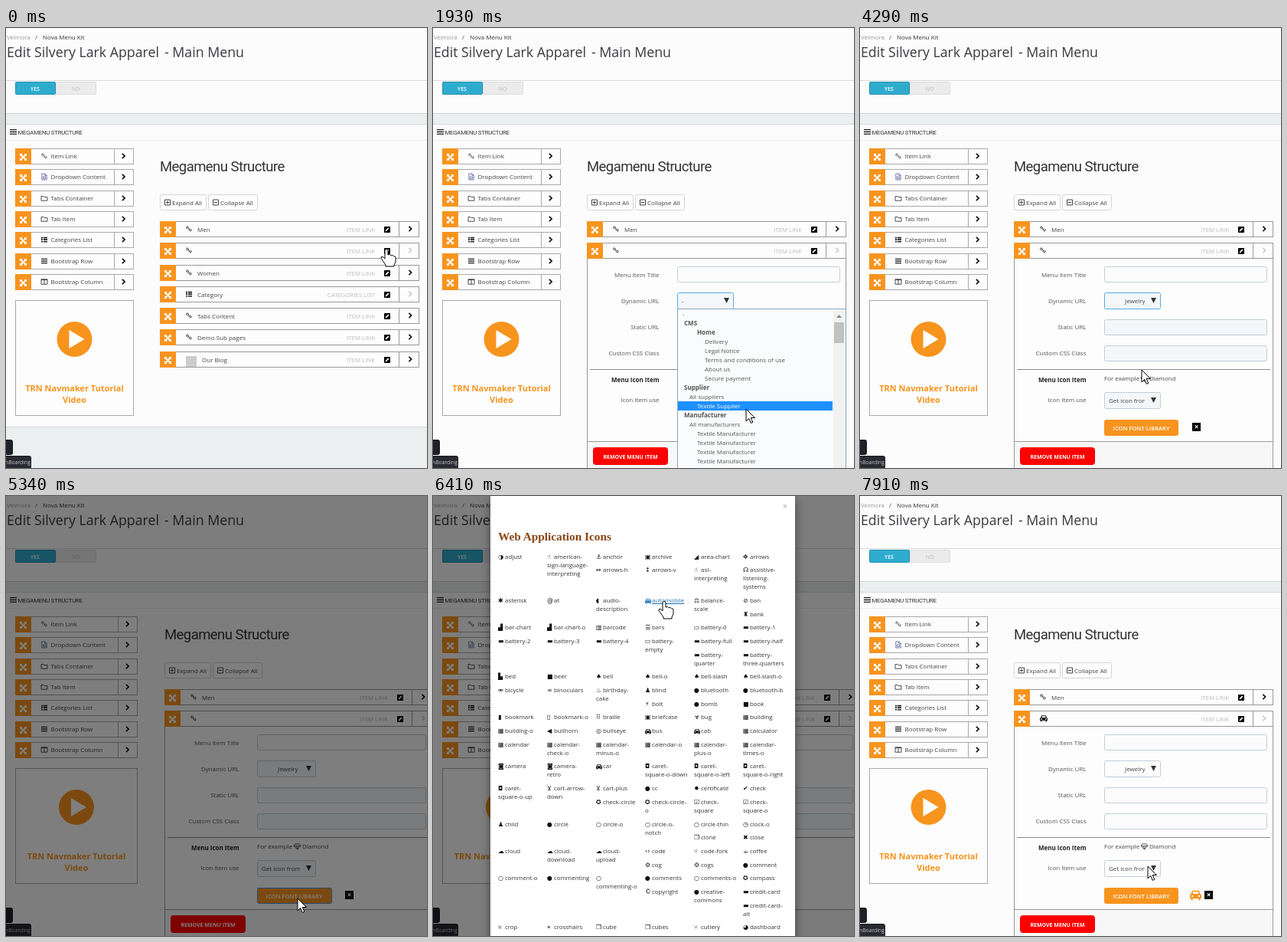
Write an HTML page that moves like this. It is 550 px wide and 574 px high and loops after 8000 ms.

```html
<!DOCTYPE html>
<html lang="en">
<head>
<meta charset="utf-8">
<title>Menu editor</title>
<style>
html, body { margin: 0; width: 100%; height: 100%; overflow: hidden; background: #fcfcfc; }
body { position: relative; font-family: 'Open Sans', sans-serif; }
#page, #cursor, #backdrop { position: absolute; left: 0; top: 0; width: 550px; height: 574px; }
#page { font-family: 'Open Sans', sans-serif; }
#page .heading { font-family: Roboto, sans-serif; letter-spacing: -.03em; }
#backdrop { background: #000; }
#modal { position: absolute; left: 75px; top: 0; width: 398px; height: 1600px; background: #fff; box-shadow: 0 4px 12px #0007; }
#modal h2 { position: absolute; left: 10px; top: 44px; margin: 0; font: bold 15.3px/18px 'Liberation Serif', serif; color: #8b4513; white-space: nowrap; }
#modal ul { position: absolute; left: 10px; top: 73.5px; width: 386px; margin: 0; padding: 0; list-style: none; font-size: 7.9px; line-height: 11px; color: #333; }
#modal li { float: left; width: 64px; padding-bottom: 6.7px; white-space: nowrap; }
#modal i { display: inline-block; width: 9px; height: 11px; vertical-align: top; font: 8px/11px 'DejaVu Sans', sans-serif; color: #111; overflow: hidden; }
#modal i svg { display: block; margin-top: 2px; fill: currentColor; }
#modal li.hover i { color: #1d6fb8; }
#modal li.hover span { color: #1d6fb8; text-decoration: underline; }
#modal b { position: absolute; left: 382px; top: 6px; font-size: 10px; line-height: 14px; color: #bbb; }
</style>
</head>
<body>
<svg id="page" viewBox="0 0 550 574"></svg>
<div id="backdrop"></div>
<div id="modal"><b>×</b><h2>Web Application Icons</h2><ul></ul></div>
<svg id="cursor" viewBox="0 0 550 574"><path fill="#fff" stroke="#000" stroke-linejoin="round"/></svg>
<script>
const LOOP = 8000, STEP = 213.4;
const ORANGE = '#f7941e', BORDER = '#a9a9a9', HEADING = 'class="heading"';
const $ = id => document.getElementById(id);

// Icons on a 10 x 10 grid: the first set is filled, the second stroked.
const fillIcons = {
  car: 'M1 4 2.2 1.2h5.6L9 4q1 .4 1 1.5V8H9v1.5H7.5V8h-5v1.5H1V8H0V5.5Q0 4.4 1 4ZM2.3 4h5.4L7 2.2H3ZM1.3 5.3v1.4h1.5V5.3ZM7.2 5.3v1.4h1.5V5.3Z',
  drag: 'M0 0h4L2.8 1.2 5 3.5 7.2 1.2 6 0h4v4L8.8 2.8 6.5 5 8.8 7.2 10 6v4H6L7.2 8.8 5 6.5 2.8 8.8 4 10H0V6l1.2 1.2L3.5 5 1.2 2.8 0 4Z',
  edit: 'M1 0h8q1 0 1 1v8q0 1-1 1H1q-1 0-1-1V1q0-1 1-1ZM2 8 2.5 6 6.5 2 8 3.5 4 7.5Z',
  list: 'M0 1h2.5v2H0ZM3.5 1H10v2H3.5ZM0 4.2h2.5v2H0ZM3.5 4.2H10v2H3.5ZM0 7.4h2.5v2H0ZM3.5 7.4H10v2H3.5Z',
  bars: 'M0 1h10v1.6H0ZM0 4.2h10v1.6H0ZM0 7.4h10V9H0Z'
};
const lineIcons = {
  link: 'M5 3.4 3.3 1.7a1.4 1.4 0 0 0-2 2L3 5.3M4.5 6.2 6.5 8.2a1.4 1.4 0 0 0 2-2L7 4.6M3.4 3.4 6.4 6.4',
  file: 'M1 0h5l3 3v7H1ZM6 0v3h3M3 5h4v3H3Z',
  folder: 'M0 2h4l1 1.3h5V9H0Z',
  columns: 'M0 1h10v8H0ZM5 1v8M0 2h10',
  chevron: 'M3 1 7 5 3 9',
  diamond: 'M2 1h6l2 3-5 5-5-5ZM0 4h10M3.3 4 5 9 6.7 4',
  plus: 'M0 0h10v10H0ZM2 5h6M5 2v6',
  minus: 'M0 0h10v10H0ZM2 5h6'
};

const rect = (x, y, w, h, fill, stroke = 'none', radius = 0) =>
  `<rect x="${x}" y="${y}" width="${w}" height="${h}" rx="${radius}" fill="${fill}" stroke="${stroke}"/>`;
const box = (x, y, w, h, stroke = BORDER, fill = '#fdfdfd', radius = 0) =>
  rect(x + .5, y + .5, w - 1, h - 1, fill, stroke, radius);
const text = (x, y, s, size = 8, fill = '#444', extra = '') =>
  `<text x="${x}" y="${y}" font-size="${size}" fill="${fill}" ${extra}>${s}</text>`;
const centered = (x, y, s, size, fill, extra = '') => text(x, y, s, size, fill, 'text-anchor="middle" ' + extra);
const icon = (name, x, y, size = 8, color = '#222', weight = 1) => {
  const paint = fillIcons[name] ? `fill="${color}" fill-rule="evenodd"`
    : `fill="none" stroke="${color}" stroke-width="${weight * 10 / size}"`;
  return `<path transform="translate(${x} ${y}) scale(${size / 10})" d="${fillIcons[name] || lineIcons[name]}" ${paint}/>`;
};
const handle = (x, y) => rect(x, y, 21, 21, ORANGE) + icon('drag', x + 6, y + 7, 9, '#fff');
const chevron = (x, y, color = '#111') => icon('chevron', x - 4, y - 4, 8, color, 1.7);

const tools = [['Item Link', 'link'], ['Dropdown Content', 'file'], ['Tabs Container', 'folder'], ['Tab Item', 'folder'],
  ['Categories List', 'list'], ['Bootstrap Row', 'bars'], ['Bootstrap Column', 'columns']];
const menuRows = ['Men', '', 'Women', 'Category', 'Tabs Content', 'Demo Sub pages', 'Our Blog'];

// Drop-down entries; a leading digit gives the level, * marks a heading.
const options = ['0-', '0*CMS', '2*Home', '3Delivery', '3Legal Notice', '3Terms and conditions of use', '3About us', '3Secure payment',
  '0*Supplier', '1All suppliers', '2Textile Supplier', '0*Manufacturer', '1All manufacturers',
  ...Array(8).fill('2Textile Manufacturer'), '0*Category', '1Home', '2Women', '2Men', '2Jewelry', '2Shoes', '2Handbags',
  '2Dresses', '2Tops', '2Blouses', '2Watches', '2Accessories', '2Summer', '2Winter', '2Sale', '2Gifts'];
const indents = [328, 335, 345, 355];

function header() {
  return rect(0, 0, 550, 574, '#fcfcfc')
    + text(1, 15, 'Velmora', 8, '#999') + text(38, 15, '/') + text(48, 15, 'Nova Menu Kit', 8, '#333')
    + text(1, 38, 'Edit Silvery Lark Apparel <tspan x="207">- Main Menu</tspan>', 17.75, '#3a3a42')
    + rect(0, 68, 550, 1, '#d8dcde')
    + box(12, 70, 53, 17, '#2590ad', '#2eacce', 1) + centered(38, 81.5, 'YES', 7, '#fff', 'font-weight="600"')
    + box(65, 70, 53, 17, '#ddd', '#ebebeb', 1) + centered(91, 81.5, 'NO', 7, '#bbb')
    + rect(0, 111, 550, 15, '#ebeff0') + rect(0, 111, 550, 1, '#cfd4d6') + rect(0, 125, 550, 1, '#d3d8da')
    + icon('bars', 5, 131, 9) + text(15.5, 139, 'MEGAMENU STRUCTURE', 7.8, '#333', HEADING)
    + rect(0, 146, 550, 1, '#eee');
}

function toolbox(wide) {
  const w = wide ? 160 : 155, mid = 12 + w / 2;
  const buttons = tools.map(([label, name], i) => {
    const y = Math.round(157 + i * 27.3);
    return box(12, y, w, 21) + handle(12, y) + icon(name, 46, y + 6, 8, name === 'file' ? '#56609a' : '#222', .8)
      + text(58.5, y + 13, label) + rect(w - 14, y, 1, 21, BORDER) + chevron(w - 1.5, y + 10);
  }).join('');
  return buttons + box(12, 355, w, 151)
    + `<circle cx="${mid}" cy="406" r="23" fill="${ORANGE}"/><path d="M${mid - 7} 394v24l20-12Z" fill="#fff"/>`
    + centered(mid, 474, 'TRN Navmaker Tutorial', 11, ORANGE, 'font-weight="700"')
    + centered(mid, 489, 'Video', 11, ORANGE, 'font-weight="700"');
}

function menuRow(i, y, wide, carChosen) {
  const x = wide ? 207 : 201, end = wide ? 557 : 540, category = i === 3, blog = i === 6;
  const mark = blog ? rect(x + 34, y + 6, 14, 14, '#ccc')
    : i === 1 && carChosen ? icon('car', x + 34, y + 5, 10)
    : icon(category ? 'list' : 'link', x + 34, y + 6, 8);
  return box(x, y, end - x, 21, '#999') + handle(x, y) + mark
    + text(x + (blog ? 55 : 49), y + 14, menuRows[i])
    + text(end - 58, y + 14, category ? 'CATEGORIES LIST' : 'ITEM LINK', 7.8, '#bbb', 'text-anchor="end"')
    + icon('edit', end - 46, y + 7, 8, '#000') + rect(end - 27, y, 1, 21, '#999')
    + chevron(end - 12, y + 10, i === 1 || category ? '#ccc' : '#111');
}

function form({ wide, selected, focus, libraryFocus, carChosen, tint }) {
  const x = wide ? 207 : 201, right = wide ? 304.5 : 295.5, field = wide ? 328 : 319;
  const end = wide ? 557 : 540, fieldW = wide ? 221 : 213, selectW = wide ? 77 : 74;
  const fill = tint ? '#f3f7f9' : '#fcfcfc', line = '#c3ced5';
  const label = (y, s, extra = '') => text(right, y, s, 8, extra ? '#222' : '#555', 'text-anchor="end" ' + extra);
  const input = (y, color = fill) => box(field, y, fieldW, 21, line, color, 2);
  const select = (y, s, textX, focused) => box(field, y, selectW, 22, focused ? '#5aaae6' : line, fill, 2)
    + text(textX, y + 14, s) + rect(field + selectW - 21, y + 3, 18, 16, fill)
    + `<path d="M${field + selectW - 13} ${y + 7}h7l-3.5 7Z" fill="#333"/>`;
  const closeX = field + (carChosen ? 131 : 115);
  return box(x, 300, end - x, 290, '#999')
    + label(325, 'Menu Item Title') + label(359, 'Dynamic URL') + label(393, 'Static URL') + label(427, 'Custom CSS Class')
    + label(462, 'Menu Icon Item', 'font-weight="700"') + label(488, 'Icon Item use')
    + input(311, '#fcfcfc') + input(380) + input(414)
    + select(345, selected, field + (selected === '-' ? 6 : 27), focus) + select(475, 'Get icon from', field + 6)
    + rect(x + 4, 445, end - x - 8, 1, '#888')
    + text(field, 460, 'For example') + icon('diamond', field + 48, 453, 9, '#333', .8) + text(field + 59, 460, 'Diamond')
    + box(field, 511, wide ? 98 : 97, 21, libraryFocus ? '#4d9be0' : '#f7941e', ORANGE, 2)
    + centered(field + 48.5, 524.5, 'ICON FONT LIBRARY', 7.6, '#fff', 'font-weight="600"')
    + (carChosen ? icon('car', field + 112, 513, 15, ORANGE) : '')
    + rect(closeX, 515, 11, 11, '#000') + centered(closeX + 5.5, 524, '×', 10, '#fff', 'font-weight="700"')
    + rect(x + 1, 540, end - x - 2, 50, '#f7f7f7') + rect(x, 539, end - x, 1, '#999')
    + box(x + 8, 547, 98, 23, '#e00', '#f00', 3)
    + centered(x + 57, 561.5, 'REMOVE MENU ITEM', 7, '#fff', 'font-weight="700"');
}

function dropdown(scroll, pointerY) {
  const hovered = pointerY > 367 ? Math.floor((pointerY - 367 + scroll) / 12) : -1;
  const rows = options.map((entry, i) => {
    const y = 367 + i * 12 - scroll, bold = entry[1] === '*', on = i === hovered;
    return (on ? rect(320, y, 202, 12, '#1e90ff') : '')
      + text(indents[entry[0]] - (i ? 0 : 2), y + 9, entry.slice(bold ? 2 : 1), 8, on ? '#fff' : '#555', bold ? 'font-weight="700"' : '');
  }).join('');
  return rect(319.5, 366.5, 220, 215, '#fafbfc', '#8aa6c1')
    + `<svg x="0" y="367" width="539" height="207" viewBox="0 367 539 207">${rows}</svg>`
    + rect(523, 367, 16, 207, '#f1f1f1') + `<path d="M527 378h7l-3.5-4Z" fill="#888"/>`
    + rect(524, 384 + scroll / 4, 13, 27, '#c1c1c1');
}

function page(s) {
  const x = s.wide ? 207 : 201, drop = 290 * s.open;
  const rowY = i => Math.round(252 + i * 28.25) + (i > 1 ? drop : 0);
  return header() + rect(0, 520 + drop, 550, 60, '#ebeff0') + rect(0, 520 + drop, 550, 1, '#d3d8da')
    + toolbox(s.wide)
    + text(x, 187, 'Megamenu Structure', 18.5, '#333', HEADING)
    + box(x, 217, 61, 21, '#d5d5d5', '#fdfdfd', 2) + icon('plus', x + 6.5, 224, 7, '#444') + text(x + 16, 231, 'Expand All')
    + box(x + 63, 217, 65, 21, '#d5d5d5', '#fdfdfd', 2) + icon('minus', x + 69.5, 224, 7, '#444') + text(x + 79, 231, 'Collapse All')
    + (s.open ? `<svg x="0" y="300" width="550" height="${drop}" viewBox="0 300 550 ${drop}">${form(s)}</svg>` : '')
    + menuRows.map((_, i) => menuRow(i, rowY(i), s.wide, s.carChosen)).join('')
    + (s.dropped ? dropdown(s.scroll, s.pointer[1]) : '')
    + box(-3, 537, 12, 20, '#15151c', '#202029', 2) + box(-3, 558, 36, 18, '#15151c', '#2a2a33', 2)
    + text(-1, 569, 'nBoarding', 6.8, '#c4c4cc');
}

// Icon names in order; | marks a line break.
const names = `adjust american-|sign-language-|interpreting anchor archive area-chart arrows arrows-h arrows-v asl-|interpreting
assistive-|listening-|systems asterisk at audio-|description automobile balance-|scale ban bank bar-chart bar-chart-o barcode bars
battery-0 battery-1 battery-2 battery-3 battery-4 battery-|empty battery-full battery-half battery-|quarter battery-|three-quarters
bed beer bell bell-o bell-slash bell-slash-o bicycle binoculars birthday-|cake blind bluetooth bluetooth-b bolt bomb book bookmark
bookmark-o braille briefcase bug building building-o bullhorn bullseye bus cab calculator calendar calendar-|check-o calendar-|minus-o
calendar-o calendar-|plus-o calendar-|times-o camera camera-|retro car caret-|square-o-down caret-|square-o-left caret-|square-o-right
caret-|square-o-up cart-arrow-|down cart-plus cc certificate check check-circle check-circle-|o check-|square check-|square-o child
circle circle-o circle-o-|notch circle-thin clock-o clone close cloud cloud-|download cloud-|upload code code-fork coffee cog cogs
comment comment-o commenting |commenting-o comments comments-o compass copyright creative-|commons credit-card credit-card-|alt crop
crosshairs cube cubes cutlery dashboard database deaf deafness desktop diamond dot-circle-o download edit ellipsis-h ellipsis-v
envelope envelope-o envelope-|square eraser exchange exclamation exclamation-|circle |exclamation-|triangle external-link
external-|link-square eye eye-slash eyedropper fax feed female fighter-jet file-archive-o file-audio-o file-code-o file-excel-o
file-image-o file-movie-o file-pdf-o file-photo-o file-picture-o file-|powerpoint-o file-sound-o file-video-o file-word-o file-zip-o
film filter fire fire-|extinguisher flag flag-|checkered flag-o flash flask folder folder-o folder-open folder-open-|o frown-o
futbol-o gamepad gavel gear gears gift glass globe graduation-|cap group hand-grab-o hand-lizard-|o hand-paper-|o hand-peace-|o
hand-|pointer-o hand-rock-o hand-|scissors-o hand-spock-|o hand-stop-o hard-of-|hearing hashtag hdd-o headphones heart heart-o
heartbeat history home hotel hourglass hourglass-1 hourglass-2 hourglass-3 hourglass-|end hourglass-|half hourglass-o hourglass-|start
i-cursor image inbox industry info info-circle institution key keyboard-o language laptop leaf legal lemon-o level-down level-up
life-bouy life-buoy life-ring life-saver lightbulb-o line-chart location-|arrow lock low-vision magic magnet mail-|forward
mail-reply`.split(/\s+/);

// The first matching prefix decides the glyph.
const glyphs = { adjust: '◑', american: '☝', anchor: '⚓', archive: '▣', 'area-': '◢', 'arrows-h': '↔', 'arrows-v': '↕', arrows: '✥',
  asl: '☝', assistive: '☊', asterisk: '✱', at: '@', audio: '◖', balance: '⚖', bank: '♜', ban: '⊘', 'bar-': '▟', barcode: '▥',
  bars: '☰', 'battery-0': '▭', 'battery-|e': '▭', batt: '▬', bed: '▙', bell: '♠', bicycle: '⚮', binoculars: '∞', birthday: '♨',
  blind: '♟', bluetooth: '●', bolt: '⚡', bomb: '●', 'bookmark-o': '▯', bookmark: '▮', braille: '⠿', briefcase: '▣', bug: '☣',
  building: '▦', bullhorn: '◀', bullseye: '◎', calc: '▦', calendar: '▦', camera: '◙', caret: '◘', cart: '⊻', cc: '●',
  certificate: '✹', 'check-circle': '✪', 'check-|': '☑', check: '✔', child: '♟', 'circle-': '○', circle: '●', clock: '◷',
  clone: '❐', close: '✖', cloud: '☁', 'code-': '⑂', code: '‹›', coffee: '☕', cog: '⚙', 'comment-o': '○', 'comments-o': '○',
  '|comm': '○', comm: '●', compass: '✪', copyright: '©', creative: '●', credit: '▬', crop: '⌗', cross: '⌖', cube: '❒',
  cutlery: '⑂', dash: '◕', data: '≣', deaf: '☊', diamond: '◇', dot: '◉', download: '⬇', edit: '✎', 'ellipsis-h': '…',
  'ellipsis-v': '⋮', env: '✉', eraser: '▰', exchange: '⇄', 'exclamation-': '●', excl: '!', '|excl': '▲', ext: '↗', eye: '◉',
  feed: '◔', female: '♀', fight: '✈', file: '▤', film: '▥', filter: '▼', fire: '♦', 'flag-o': '⚐', flag: '⚑', flash: '⚡',
  flask: '♙', 'folder-o': '▱', folder: '▰', frown: '☹', futbol: '⚽', gavel: '⚒', gear: '⚙', glass: '▼', globe: '◍', group: '♟',
  hand: '☝', hard: '☊', hashtag: '#', headphones: '∩', 'heart-o': '♡', heart: '♥', history: '↺', home: '⌂', hotel: '▙',
  hourglass: '⧗', 'i-': 'I', 'info-': '●', info: 'i', inst: '♜', key: '⚷', leaf: '❧', legal: '⚒', 'level-down': '↴',
  'level-up': '↱', 'life-': '◎', light: '♀', 'line-': '∿', loc: '➤', magic: '✦', magnet: '∪', mail: '↰' };
const glyphOf = name => glyphs[Object.keys(glyphs).find(prefix => name.startsWith(prefix))] || '■';
const carIcon = `<svg width="8" height="8" viewBox="0 0 10 10"><path fill-rule="evenodd" d="${fillIcons.car}"/></svg>`;

document.querySelector('#modal ul').innerHTML = names.map(name => {
  const mark = ['automobile', 'bus', 'car', 'cab'].includes(name) ? carIcon : glyphOf(name);
  return `<li id="icon-${name}"><i>${mark}</i><span>${name.replaceAll('|', '<br>')}</span></li>`;
}).join('');

const ARROW = 'M0 0v16l3.7-3.6 2.6 6 2.5-1.1-2.6-5.8h5.2Z';
const HAND = 'M-2 1.5Q0-1 2 1.5V8q3-1.5 4 .8 3-1 3.6 1 2.4-.4 2.4 2V17l-2 4v2H-1v-2L-7 12.5q-.5-3 2.5-2L-2 13Z';

// Pointer path: step, x, y.
const route = [[0, 497, 288], [3, 497, 288], [6, 385, 353], [7, 385, 353], [9, 409, 497], [10, 409, 480], [11, 409, 462],
  [14, 409, 480], [16, 409, 480], [20, 368, 446], [23, 381, 525], [26, 381, 525], [30, 302, 137], [33, 302, 137], [37, 376, 483]];

function pointerAt(step) {
  const i = Math.max(1, route.findIndex(key => key[0] >= step));
  const [a, b] = [route[i - 1], route[i]], k = (step - a[0]) / (b[0] - a[0]);
  return [1, 2].map(j => a[j] + (b[j] - a[j]) * k);
}

function draw(step) {
  const between = (a, b) => step >= a && step <= b;
  const pointer = pointerAt(step);
  $('page').innerHTML = page({
    pointer,
    wide: between(24, 34),
    open: step < 2 ? 0 : step === 2 ? .15 : step === 3 ? .75 : 1,
    dropped: between(7, 15),
    scroll: step < 10 ? 0 : step === 10 ? 96 : 192,
    selected: step < 16 ? '-' : 'Jewelry',
    focus: between(7, 22),
    libraryFocus: between(23, 32),
    carChosen: step >= 33,
    tint: step < 34
  });
  $('backdrop').style.opacity = between(25, 33) ? .5 : step === 24 ? .2 : step === 34 ? .25 : 0;

  const [opacity, shift] = step === 26 ? [.6, -150] : between(27, 32) ? [1, 0] : step === 33 ? [.43, -479] : [0, 0];
  $('modal').style.opacity = opacity;
  $('modal').style.transform = `translateY(${shift}px)`;
  $('icon-automobile').className = between(30, 32) ? 'hover' : '';

  const shape = document.querySelector('#cursor path');
  shape.setAttribute('d', step <= 3 || between(30, 32) ? HAND : ARROW);
  shape.setAttribute('transform', `translate(${pointer})`);
}

let shown = -1;
function tick() {
  const step = Math.floor((performance.now() % LOOP + 5) / STEP);
  if (step !== shown) draw(shown = step);
  requestAnimationFrame(tick);
}
tick();
</script>
</body>
</html>
```
